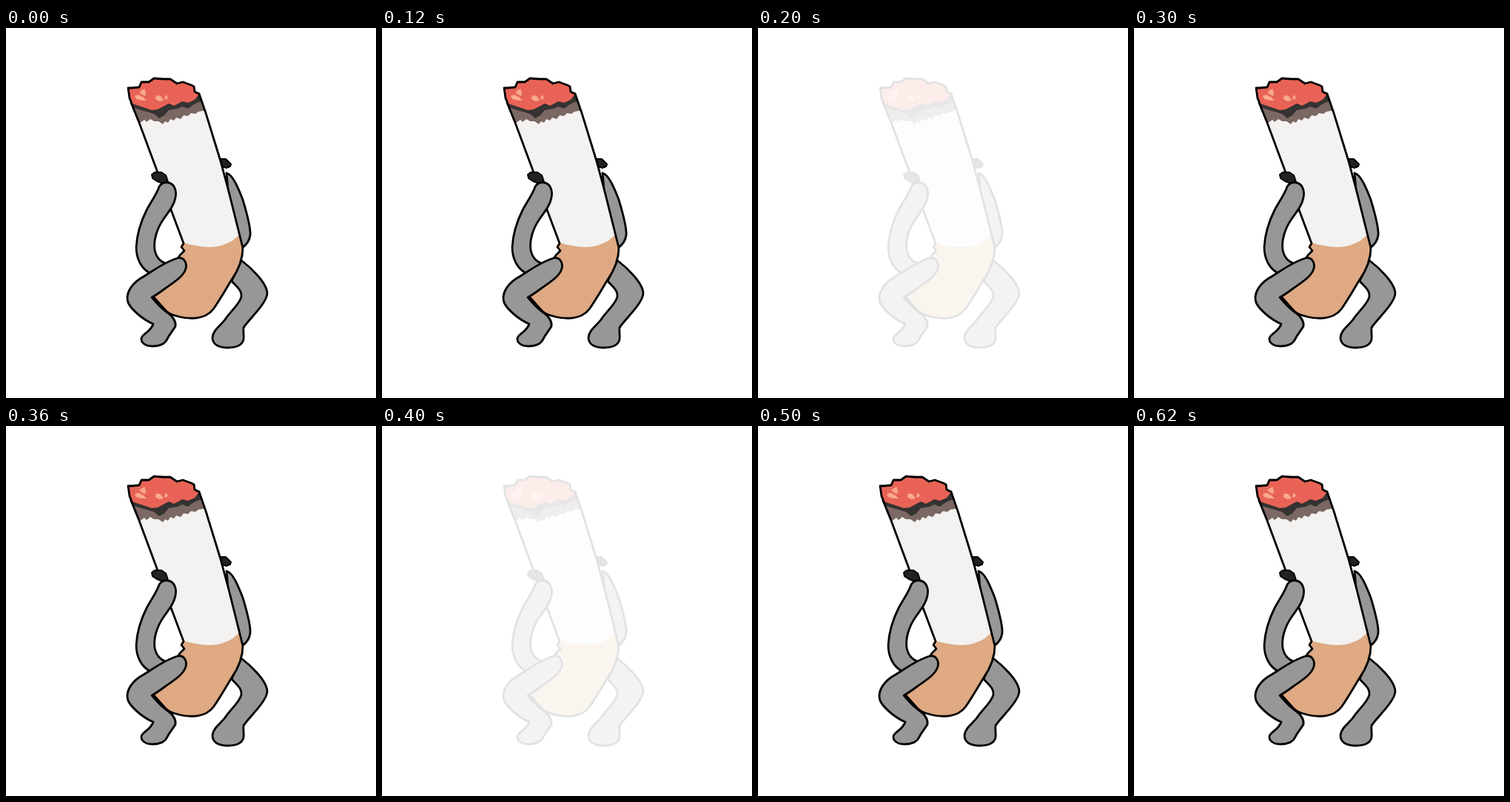
Write an HTML page with a canvas that moves like this. It is 500x500 px and loops after 700 ms.

```html
<!DOCTYPE html>
<html lang="en">
<head>
<meta charset="utf-8">
<title>Blinking cigarette</title>
<style>
  html, body { margin: 0; width: 100%; height: 100%; overflow: hidden; background: #fff; }
  canvas { display: block; width: 500px; height: 500px; }
</style>
</head>
<body>
<canvas id="stage" width="500" height="500"></canvas>
<script>
const canvas = document.getElementById('stage');
const ctx = canvas.getContext('2d');
const GREY = '#979797';
const LINE = 2.8;
const LOOP = 700;

function shape(d, fill, line = 0) {
  const path = new Path2D(d);
  if (fill) {
    ctx.fillStyle = fill;
    ctx.fill(path);
  }
  if (line) {
    ctx.lineWidth = line;
    ctx.stroke(path);
  }
}

const body = `M169 101 L180 128 L203 190 L222 243 L240 291 L237 296 L241 301 L235 307
  L199 363 L216 382 Q221 387 230 389 C251 395 270 393 280 380
  C288 369 297 353 305 340 C314 327 320 314 320 297
  L301 221 L290 180 L270 115 L261 89 Z`;

function drawLimbsBehind() {
  shape(`M298 196 C306 198 313 214 320 232 C326 252 331 270 330 280
    C329 288 325 293 319 297 L301 230 Z`, GREY, LINE);
  shape(`M318 314 C326 320 353 343 353 359 C352 373 326 396 321 405
    C320 411 322 414 321 421 C319 429 311 432 300 432 C288 432 279 428 279 418
    C280 408 290 402 296 394 C304 382 316 373 318 363 C319 354 311 349 305 342 Z`, GREY, LINE);
  shape('M290 177 L297 177 L304 184 L303 187 L298 189 L290 187 Z', '#222', 2);
}

function drawBody() {
  shape(body, '#f3f2f1');
  ctx.save();
  ctx.clip(new Path2D(body));
  shape('M190 291 L239 290 Q278 301 296 292 Q308 288 315 279 L330 275 V400 H190 Z', '#dea983');
  shape(`M160 90 L180 129 L187 124 L190 127 L195 123 L200 126 L206 126 L212 130
    L215 126 L219 128 L222 123 L227 125 L230 121 L236 123 L240 118 L246 119
    L250 115 L256 116 L260 113 L272 111 L262 85 Z`, '#7b6763');
  shape(`M160 90 L173 108 L183 111 L190 113 L200 116 L207 122 L214 118 L220 111
    L232 109 L238 106 L246 109 L254 103 L268 97 L262 85 Z`, '#343331');
  ctx.restore();
  shape(body, null, LINE);
}

function drawEmber() {
  const top = `M170 102 L167 95 L165 81 L170 81 L180 80 L183 73 L193 73
    L200 68 L213 69 L222 69 L231 75 L239 73 L250 77 L254 79 L255 86 L261 89`;
  shape(top + ` L255 97 L246 101 L238 99 L235 101 L227 105 L220 102 L205 110
    L197 111 L185 107 Z`, '#e86356');
  const glow = [
    'M181 86 L187 82 L189 88 L188 92 L182 89 Z',
    'M174 92 L179 90 L186 94 L190 98 L184 98 L176 96 Z',
    'M203 91 L209 92 L213 98 L207 99 L202 96 Z',
    'M216 90 L219 94 L216 97 L214 95 Z'
  ];
  glow.forEach(d => shape(d, '#f9a98d'));
  shape(top, null, LINE);
}

function drawLimbsInFront() {
  shape('M197 198 L201 195 L210 195 L216 199 L219 208 L212 210 L204 207 L198 203 Z', '#222', 2);
  shape(`M206 217 C208 210 214 208 219 209 C227 210 231 219 229 229
    C227 240 220 248 213 258 C204 271 199 287 201 300 C203 310 208 315 217 319
    L196 332 C183 326 176 312 176 296 C177 277 182 262 190 246
    C197 233 203 225 206 217 Z`, GREY, LINE);
  shape(`M232 311 C240 309 245 317 243 325 C240 336 226 344 215 352
    C207 358 203 361 197 364 C203 371 210 379 216 383 C225 389 230 395 229 403
    C225 410 221 414 218 420 C215 427 208 430 198 430 C188 430 182 425 183 419
    C185 413 195 411 199 400 C185 394 165 378 164 367 C163 355 172 344 184 337
    C198 329 214 316 232 311 Z`, GREY, LINE);
}

ctx.strokeStyle = '#000';
ctx.lineJoin = ctx.lineCap = 'round';
drawLimbsBehind();
drawBody();
drawEmber();
drawLimbsInFront();

const start = performance.now();

function tick() {
  const t = (performance.now() - start) % LOOP;
  const faded = (t >= 200 && t < 300) || (t >= 400 && t < 500);
  canvas.style.opacity = faded ? 0.11 : 1;
  requestAnimationFrame(tick);
}
tick();
</script>
</body>
</html>
```
